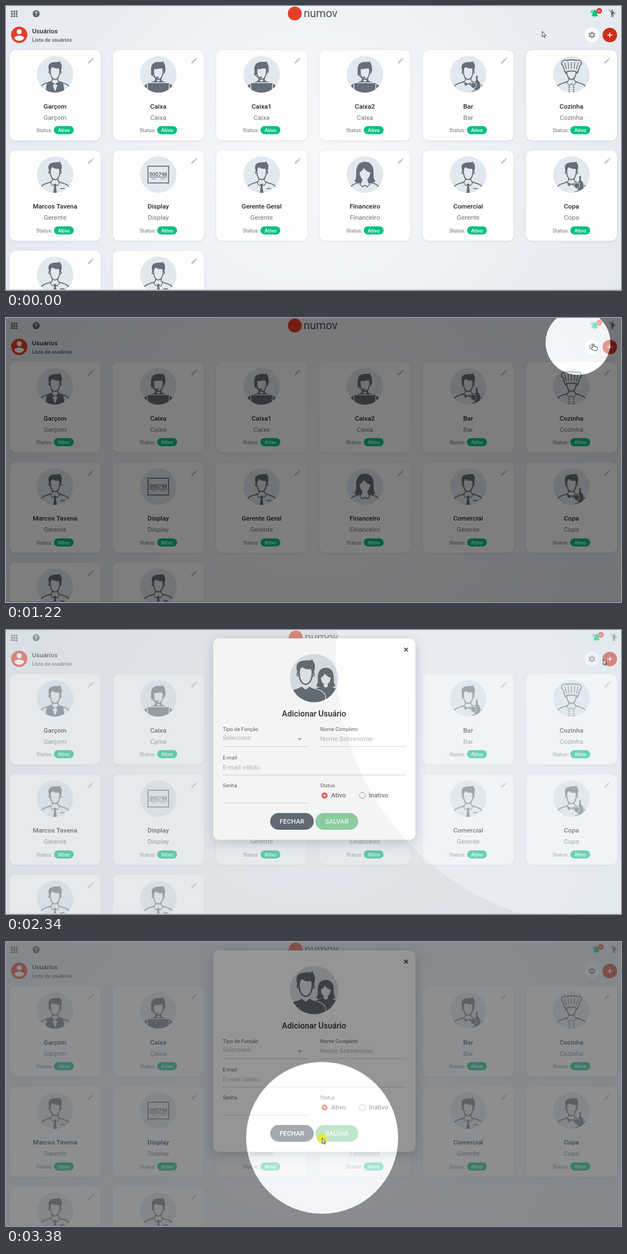
An HTML page with a canvas that plays this animation: 1101 by 509 pixels, repeating every 3440 ms.

```html
<!DOCTYPE html>
<html lang="pt-BR">
<head>
<meta charset="utf-8">
<title>Usuários</title>
<style>
  html, body { margin: 0; width: 100%; height: 100%; overflow: hidden; background: #e6ebf1; }
  canvas { display: block; }
</style>
</head>
<body>
<canvas id="stage" width="1101" height="509"></canvas>
<script>
const W = 1101, H = 509, LOOP = 3440;
const ctx = document.getElementById('stage').getContext('2d');
const FONT = 'Roboto, sans-serif';
const INK = '#666e77', PALE = '#e1e8ef', RED = '#e53f2a', GREEN = '#00c07f', GREY = '#6c757d';

// Screen refreshes: start, end, number of updates
const BURSTS = [[650, 1150, 8], [1220, 1680, 8], [1770, 2150, 7], [2340, 2840, 8], [2900, 3380, 8]];
const SPOTS = [[638, 1543], [2328, 3354]];
const easeIn = p => p * p;
const easeOut = p => 1 - (1 - p) * (1 - p);
const CURSOR = [[0, 960, 46], [940, 960, 46], [1220, 1049, 46, easeIn], [1480, 1069, 53, easeOut],
  [2640, 1069, 53], [3037, 683, 270, easeIn], [3250, 566, 352, easeOut]];
const LIGHT = [[0, 960, 46], [960, 960, 46], [1220, 1024, 44, easeIn], [1530, 1069, 53, easeOut],
  [2680, 1069, 53], [3037, 725, 226, easeIn], [3300, 566, 351, easeOut]];

const CARDS = [
  ['Garçom', 'Garçom', 'vest'], ['Caixa', 'Caixa', 'operator'], ['Caixa1', 'Caixa', 'operator'],
  ['Caixa2', 'Caixa', 'operator'], ['Bar', 'Bar', 'bar'], ['Cozinha', 'Cozinha', 'chef'],
  ['Marcos Tavena', 'Gerente', 'tie'], ['Display', 'Display', 'display'], ['Gerente Geral', 'Gerente', 'tie'],
  ['Financeiro', 'Financeiro', 'woman'], ['Comercial', 'Gerente', 'tie'], ['Copa', 'Copa', 'bar'],
  ['', '', 'tie'], ['', '', 'tie']
];

const clamp = v => Math.max(0, Math.min(1, v));
const span = (t, a, b) => clamp((t - a) / (b - a));

function at(x, y, scale, draw) {
  ctx.save();
  ctx.translate(x, y);
  ctx.scale(scale, scale);
  draw();
  ctx.restore();
}
function shape(d, fill, stroke, width = 1.8) {
  const path = new Path2D(d);
  if (fill) { ctx.fillStyle = fill; ctx.fill(path); }
  if (stroke) { ctx.strokeStyle = stroke; ctx.lineWidth = width; ctx.stroke(path); }
}
function disc(x, y, r, fill, stroke, width = 1) {
  ctx.beginPath();
  ctx.arc(x, y, r, 0, Math.PI * 2);
  if (fill) { ctx.fillStyle = fill; ctx.fill(); }
  if (stroke) { ctx.strokeStyle = stroke; ctx.lineWidth = width; ctx.stroke(); }
}
function box(x, y, w, h, r, fill) {
  ctx.beginPath();
  ctx.roundRect(x, y, w, h, r);
  ctx.fillStyle = fill;
  ctx.fill();
}
function shadowBox(x, y, w, h, r, blur, shade) {
  ctx.save();
  ctx.shadowColor = shade;
  ctx.shadowBlur = blur;
  ctx.shadowOffsetY = blur / 4;
  box(x, y, w, h, r, '#fefefe');
  ctx.restore();
}
function text(s, x, y, size, color, weight = 400, align = 'left') {
  ctx.font = `${weight} ${size}px ${FONT}`;
  ctx.textAlign = align;
  ctx.fillStyle = color;
  ctx.fillText(s, x, y);
}
// Icons live in a 24-unit square centred on x, y
function icon(d, x, y, scale, color) {
  at(x, y, scale, () => { ctx.translate(-12, -12); shape(d, color); });
}

const PENCIL = 'M3 17.25V21h3.75L17.81 9.94l-3.75-3.75zM20.71 7.04c.39-.39.39-1.02 0-1.41l-2.34-2.34c-.39-.39-1.02-.39-1.41 0l-1.83 1.83 3.75 3.75z';
const BELL = 'M7.6 4.1L6.2 2.6C3.7 4.5 2.2 7.3 2 10.5h2c.2-2.6 1.5-5 3.6-6.4zM20 10.5h2c-.2-3.2-1.7-6-4.1-7.9l-1.5 1.5c2 1.4 3.4 3.8 3.6 6.4zM18 11c0-3-1.6-5.6-4.5-6.3V4a1.5 1.5 0 0 0-3 0v.7C7.6 5.4 6 8 6 11v5l-2 2v1h16v-1l-2-2zM10 20a2 2 0 0 0 4 0z';
const PERSON = 'M12 2a2 2 0 1 1 0 4 2 2 0 0 1 0-4zM15.9 8.1C15.5 7.7 14.8 7 13.5 7H11C8.2 7 6 4.8 6 2H4c0 3.2 2.1 5.8 5 6.7V22h2v-6h2v6h2V10l4 4 1.4-1.4z';
const BODY = 'M-5 6V11C-8 16 -24 14 -26 25V38H26V25C24 14 8 16 5 11V6';
const BOW = 'M0 17L-6 13.5V20.5ZM0 17L6 13.5V20.5Z';

function face() {
  disc(-9, -4, 2.2, PALE, INK, 1.4);
  disc(9, -4, 2.2, PALE, INK, 1.4);
  shape('M-8.5 -8C-9 4 -4 9 0 9S9 4 8.5 -8Q8 -15 0 -15T-8.5 -8Z', PALE, INK);
}
function manHead() {
  face();
  shape('M-9.5 -4C-13 -12 -13 -19 -6 -21C0 -23 5 -21 9 -23.5Q9 -21 11 -19C13 -15 12 -9 9.5 -4L8 -11Q0 -9 -5 -14L-8 -10Z', INK);
}
function womanHead() {
  shape('M0 -23C-13 -23 -16 -12 -15.5 -2Q-15 8 -19 12Q-13 16 -5 15H5Q13 16 19 12Q15 8 15.5 -2C16 -12 13 -23 0 -23Z', INK);
  shape('M-9.5 -4C-9 5 -4 10 0 10S9 5 9.5 -4Q3 -5 -2 -12Q-5 -6 -9.5 -4Z', PALE);
}
function collar() {
  shape('M-5.5 11L-8 15L-4 20L0 16.5L4 20L8 15L5.5 11', PALE, INK, 1.2);
}

const AVATARS = {
  tie() {
    shape(BODY, PALE, INK);
    collar();
    shape('M-2.5 17H2.5L1.6 21L3.6 36H-3.6L-1.6 21Z', INK);
    shape('M9 25H17', null, INK, 1.6);
    manHead();
  },
  vest() {
    shape(BODY, PALE, INK);
    shape('M-7 12L-14 15Q-17 22 -16 38H16Q17 22 14 15L7 12L0 31Z', INK);
    shape(BOW, INK);
    manHead();
  },
  bar() {
    shape(BODY, PALE, INK);
    collar();
    shape(BOW, INK);
    manHead();
    shape('M13.5 2H17.5V10Q22 14 22 18V30H11V18Q11 14 13.5 10Z', INK, PALE, 1);
    shape('M5 15H14Q16 23 10.5 25V29H14V31H5.5V29H9V25Q3 23 5 15Z', INK, PALE, 1);
  },
  operator() {
    shape(BODY, INK, INK);
    manHead();
    shape('M-12 -2C-16 -20 -6 -22 0 -22S16 -20 12 -2Q10 -10 6 -12Q-2 -8 -9 -10Z', INK);
    shape('M-11 -1Q-10 6 -2 6', null, INK, 1.5);
    box(-13, -7, 4, 9, 2, INK);
    box(-4, 4, 5, 3, 1.5, INK);
    shape('M-20 15H20L18.5 36H-18.5Z', INK, PALE, 1.5);
    shape('M-4 10L0 14L4 10Z', PALE);
  },
  chef() {
    shape(BODY, PALE, INK);
    collar();
    for (let i = 0; i < 6; i++) disc(i % 2 ? 4 : -4, 23 + 4 * (i >> 1), 1.3, INK);
    face();
    shape('M-11.5 -4L-15 -15C-21 -20 -16 -27 -9 -25Q0 -27 9 -25C16 -27 21 -20 15 -15L11.5 -4Q0 -8 -11.5 -4Z', PALE, INK);
    shape('M-12 -21L-9 -9M-6 -22L-5 -10M0 -22V-10M6 -22L5 -10M12 -21L9 -9', null, INK, 1.4);
  },
  woman() {
    shape(BODY, PALE, INK);
    womanHead();
    shape('M-5 9V13L0 19L5 13V9', PALE);
    shape('M-6 13L-9 17L-4 22L0 19L4 22L9 17L6 13', PALE, INK, 1.5);
  },
  display() {
    ctx.strokeStyle = INK;
    ctx.lineWidth = 1.7;
    ctx.strokeRect(-18.5, -15, 37, 30);
    text('000748', 0, 2.5, 9.3, INK, 700, 'center');
    shape('M-16 4.5H16', null, INK, 1);
    shape('M-12 7.5H-4M4 7.5H12', null, INK, 0.8);
  }
};

function avatar(kind, x, y) {
  at(x, y, 1, () => {
    disc(0, 0, 32.7, PALE);
    ctx.clip();
    AVATARS[kind]();
  });
}

function badge(x, y) {
  box(x, y, 35.5, 14.6, 7.3, GREEN);
  text('Ativo', x + 17.8, y + 10.6, 9.3, '#fff', 500, 'center');
}

function card([name, role, kind], i) {
  const x = 6.5 + 184.9 * (i % 6), y = 79 + 179.7 * Math.floor(i / 6), cx = x + 81.3;
  shadowBox(x, y, 163, 162, 11, 4, 'rgba(70,85,105,.15)');
  avatar(kind, cx, y + 43.5);
  icon(PENCIL, x + 145.5, y + 18.8, 0.58, '#c3c4c6');
  text(name, cx, y + 104.5, 11.7, '#212529', 500, 'center');
  text(role, cx, y + 124.7, 11.7, GREY, 400, 'center');
  text('Status:', x + 47.7, y + 147, 9.3, GREY);
  badge(x + 79.3, y + 136.2);
}

function gear(x, y) {
  at(x, y, 1, () => {
    for (let i = 0; i < 6; i++) {
      box(-1.7, -6.2, 3.4, 4, 0.6, '#96999c');
      ctx.rotate(Math.PI / 3);
    }
    disc(0, 0, 4.6, '#96999c');
    disc(0, 0, 2.1, '#fff');
  });
}

function page(shifted) {
  const back = ctx.createRadialGradient(550, 270, 40, 550, 270, 620);
  back.addColorStop(0, '#f8f8fa');
  back.addColorStop(1, '#e3e9f0');
  ctx.fillStyle = back;
  ctx.fillRect(0, 0, W, H);

  const mid = shifted ? 1.7 : 0, right = shifted ? 3 : 0;
  for (let i = 0; i < 9; i++) box(9 + 4.3 * (i % 3), 8.2 + 4.3 * Math.floor(i / 3), 3, 3, 0.3, '#5c646c');
  disc(54, 13.8, 6.3, '#5c646c');
  text('?', 54, 17.3, 9.8, '#f0f3f6', 700, 'center');
  disc(517 + mid, 13.5, 12.5, RED);
  text('numov', 533 + mid, 20.3, 20, '#4b4f54');
  icon(BELL, 1054 + right, 13.3, 0.72, GREEN);
  disc(1062 + right, 8.7, 5, '#dc3027');
  text('01', 1062 + right, 10.7, 5.4, '#fff', 500, 'center');
  icon(PERSON, 1085.5 + right, 13.2, 0.68, '#5c646c');

  disc(23.7, 51.6, 14.6, RED);
  disc(23.7, 46, 4.5, '#fff');
  shape('M14.9 57.5C15 54.6 20.8 53 23.7 53S32.4 54.6 32.5 57.5A10.5 10.5 0 0 1 14.9 57.5Z', '#fff');
  text('Usuários', 46.7, 49.3, 11.6, '#24282c', 500);
  text('Lista de usuários', 46.7, 64, 9.3, '#555b61', 500);
  disc(1049, 52, 13, '#fff');
  gear(1049, 52);
  disc(1081, 52, 13, '#c9301c');
  shape('M1076.7 52H1085.3M1081 47.7V56.3', null, '#fff', 1.6);

  CARDS.forEach(card);
  ctx.fillStyle = '#bfc3c8';
  ctx.fillRect(0, 508, W, 1);
}

function couple() {
  const pale = '#d9e2ea';
  disc(551.5, 86.3, 43.3, pale);
  ctx.clip();
  at(572.5, 89, 0.92, () => {
    shape(BODY, INK);
    womanHead();
    shape('M-4 9V13L0 16L4 13V9', PALE);
  });
  at(536.5, 85, 1.38, () => {
    shape(BODY, INK, pale, 1);
    shape('M-5 8V12L0 16L5 12V8Z', PALE);
    manHead();
  });
}

function field(label, x, y, width, hint = '', hintY = y + 18) {
  text(label, x, y, 9.3, '#60676e');
  text(hint, x, hintY, 11.7, '#b4b9be');
  if (width) {
    ctx.fillStyle = '#cdd1d5';
    ctx.fillRect(x, y + 27.5, width, 1);
  }
}
function button(label, x, width, fill, color) {
  box(x, 328, width, 30, 15, fill);
  text(label, x + width / 2, 347, 11.7, color, 500, 'center');
}

function modal() {
  shadowBox(371, 15, 362, 361, 10, 22, 'rgba(50,60,75,.24)');
  shape('M713 32L719.4 38.4M719.4 32L713 38.4', null, '#4a4f55', 1.8);
  at(0, 0, 1, couple);
  text('Adicionar Usuário', 551.5, 155.3, 14.4, '#2b3035', 500, 'center');
  field('Tipo de Função', 388, 181, 153, 'Selecione', 197);
  shape('M522 194H529.5L525.7 198Z', '#a8adb2');
  field('Nome Completo', 562.5, 181, 153.5, 'Nome Sobrenome');
  field('E-mail', 388, 232, 328, 'E-mail válido');
  field('Senha', 388, 282.3, 153);
  field('Status', 562.5, 282.3, 0);
  disc(570.3, 296.5, 5.4, '#e5604f');
  disc(570.3, 296.5, 2.1, '#fff');
  text('Ativo', 582, 300.2, 11.7, '#4c5258');
  disc(638, 296.5, 5.4, '#fff', '#a3a8ad', 1);
  text('Inativo', 649.5, 300.2, 11.7, '#4c5258');
  button('FECHAR', 473, 78, '#646c75', '#fff');
  button('SALVAR', 554, 76.5, '#92d3a6', '#f1faf4');
}

function spotlight(t) {
  const active = SPOTS.find(([on, off]) => t >= on && t < off + 500);
  if (!active) return;
  const [on, off] = active;
  const settle = from => 1 - (1 - span(t, from, from + 500)) ** 3.5;
  const g = t < off ? settle(on) : 1 - settle(off);
  const [x, y] = follow(LIGHT, t), r = 516 - 458 * g;
  disc(x, y, r, `rgba(255,255,255,${g / 2})`);
  ctx.beginPath();
  ctx.rect(0, 0, W, H);
  ctx.arc(x, y, r, 0, Math.PI * 2);
  ctx.fillStyle = `rgba(0,0,0,${g / 2})`;
  ctx.fill('evenodd');
}

function follow(track, t) {
  const next = track.findIndex(key => key[0] > t);
  if (next < 0) return track[track.length - 1].slice(1, 3);
  const [t0, x0, y0] = track[next - 1], [t1, x1, y1, ease = p => p] = track[next];
  const p = ease(span(t, t0, t1));
  return [x0 + (x1 - x0) * p, y0 + (y1 - y0) * p];
}

function pointer(t) {
  const [x, y] = follow(CURSOR, t);
  const click = t >= 3354 ? 1 : t >= 1543 ? 1 - span(t, 1600, 1740) : 0;
  if (click) disc(x, y, 9, `rgba(228,236,50,${0.88 * click})`);
  const hand = t >= 1190 && t < 1750;
  at(x, y, 1, () => hand
    ? shape('M1 1Q2.3 -.5 3.5 1V5Q5 4 5.8 5.4Q7.3 4.6 8 6Q9.5 5.4 9.8 7.2V9.5L8.5 12.5H3L-1 8.3Q-1.3 6.2 1 7.2Z', '#fff', '#222', 0.9)
    : shape('M0 -.6V9.3L2.3 7.3L3.8 10.5L5.3 9.8L3.9 6.8H6.8Z', '#fff', '#222', 0.9));
}

function heldTime(t) {
  let held = 0;
  for (const [start, end, count] of BURSTS) {
    if (t < start) break;
    const gap = (end - start) / (count - 1);
    held = start + gap * Math.min(count - 1, Math.floor((t - start) / gap + 1e-6));
  }
  return held;
}

function render(t) {
  page(t >= 1760);
  const veil = span(t, 1770, 1920);
  if (veil) {
    ctx.fillStyle = `rgba(222,229,236,${0.45 * veil})`;
    ctx.fillRect(0, 0, W, H);
  }
  const open = span(t, 1850, 2150);
  if (open) {
    ctx.save();
    ctx.globalAlpha = clamp(open * 2);
    ctx.translate(0, -29 * (1 - easeOut(open)));
    modal();
    ctx.restore();
  }
  spotlight(t);
  pointer(t);
}

const began = performance.now();
function tick() {
  render(heldTime((performance.now() - began) % LOOP));
  requestAnimationFrame(tick);
}
tick();
</script>
</body>
</html>
```
